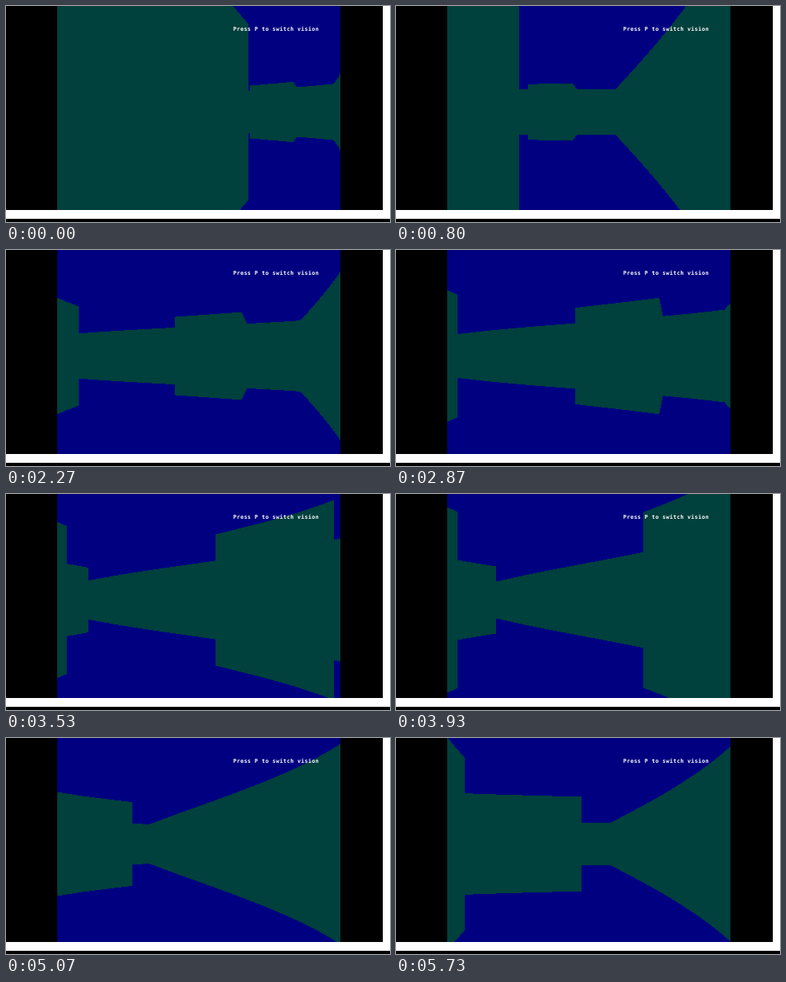
An HTML page with a canvas for the animation above (5.79 s loop, 480x270 px).

```html
<!DOCTYPE html>
<html lang="en">
<head>
<meta charset="utf-8">
<title>Maze walk</title>
<style>
  html, body { margin: 0; width: 100%; height: 100%; overflow: hidden; background: #000; }
  canvas { position: absolute; left: 0; top: 0; }
  div {
    position: absolute; left: 284px; top: 25px; white-space: pre; color: #fff;
    font: bold 6.8px/9px "DejaVu Sans Mono", monospace; letter-spacing: 0.37px;
  }
</style>
</head>
<body>
<canvas width="480" height="270"></canvas>
<div>Press P to switch vision</div>
<script>
const ctx = document.querySelector('canvas').getContext('2d');
const LOOP = 5790, FRAMES = 87, STEP = LOOP / FRAMES;
const LEFT = 64, WIDTH = 354, BOTTOM = 255, HORIZON = 132.5;
const RAD = Math.PI / 180, FOV = 83 * RAD, WALL = 144;

// Straight legs of the walk, one per waypoint
const waypoints = [
  { t: 600, x: 1.44, y: -5.28 },
  { t: 1800, x: 1.43, y: -4.1 },
  { t: 3530, x: 0.93, y: -2.49 },
  { t: 4800, x: 0.05, y: -1.55 },
  { t: 5730, x: -0.57, y: -1.16 }
];

// Progress from 0 to 1 between two times
const ramp = (t, from, to) => Math.min(1, Math.max(0, (t - from) / (to - from)));

function positionAt(t) {
  let { x, y } = waypoints[0];
  for (let i = 1; i < waypoints.length; i++) {
    const a = waypoints[i - 1], b = waypoints[i], k = ramp(t, a.t, b.t);
    x += (b.x - a.x) * k;
    y += (b.y - a.y) * k;
  }
  return { x, y };
}

// Degrees left of north: one turn right, then three turns left
const turnAt = t => 33.5 - 32 * ramp(t, 0, 600) + 22.5 * ramp(t, 1800, 2400)
  + 21 * ramp(t, 2870, 3940) + 39 * ramp(t, 4800, 5400);

function isWall(x, y) {
  const room = x >= -6 && x < 2 && y < 0;
  const pillar = x === 0 && y === -1;
  const blocks = (x <= -4 && y <= -2) || (x === -2 && y <= -3) || (x < 1 && y <= -5);
  return !room || pillar || blocks;
}

// Distance along a ray to the first wall, stepping from cell to cell
function cast(px, py, dx, dy) {
  let x = Math.floor(px), y = Math.floor(py), dist = 0;
  const sx = Math.sign(dx), sy = Math.sign(dy);
  const stepX = Math.abs(1 / dx), stepY = Math.abs(1 / dy);
  let nextX = (sx > 0 ? x + 1 - px : px - x) * stepX;
  let nextY = (sy > 0 ? y + 1 - py : py - y) * stepY;
  while (!isWall(x, y)) {
    if (nextX < nextY) { dist = nextX; nextX += stepX; x += sx; }
    else { dist = nextY; nextY += stepY; y += sy; }
  }
  return dist;
}

function rect(color, x, y, w, h) {
  ctx.fillStyle = color;
  ctx.fillRect(x, y, w, h);
}

function draw(t) {
  const { x, y } = positionAt(t);
  const heading = -turnAt(t) * RAD;
  rect('#000', 0, 0, 480, 270);
  rect('#000080', LEFT, 0, WIDTH, BOTTOM);
  for (let i = 0; i < WIDTH; i++) {
    const off = ((i + 0.5) / WIDTH - 0.5) * FOV;
    const ray = heading + off + 1e-7;
    const depth = cast(x, y, Math.sin(ray), Math.cos(ray)) * Math.cos(off);
    const h = WALL / Math.max(depth, 0.01);
    const top = Math.max(0, Math.round(HORIZON - h));
    const end = Math.min(BOTTOM, Math.round(HORIZON + h));
    rect('#00403d', LEFT + i, top, 1, end - top);
  }
  rect('#fff', 471, 0, 9, 266);
  rect('#fff', 0, BOTTOM, 480, 11);
}

const start = performance.now();
function tick() {
  const t = (performance.now() - start) % LOOP;
  draw(Math.min(FRAMES - 1, Math.floor((t + 2) / STEP)) * STEP);
  requestAnimationFrame(tick);
}
tick();
</script>
</body>
</html>
```
